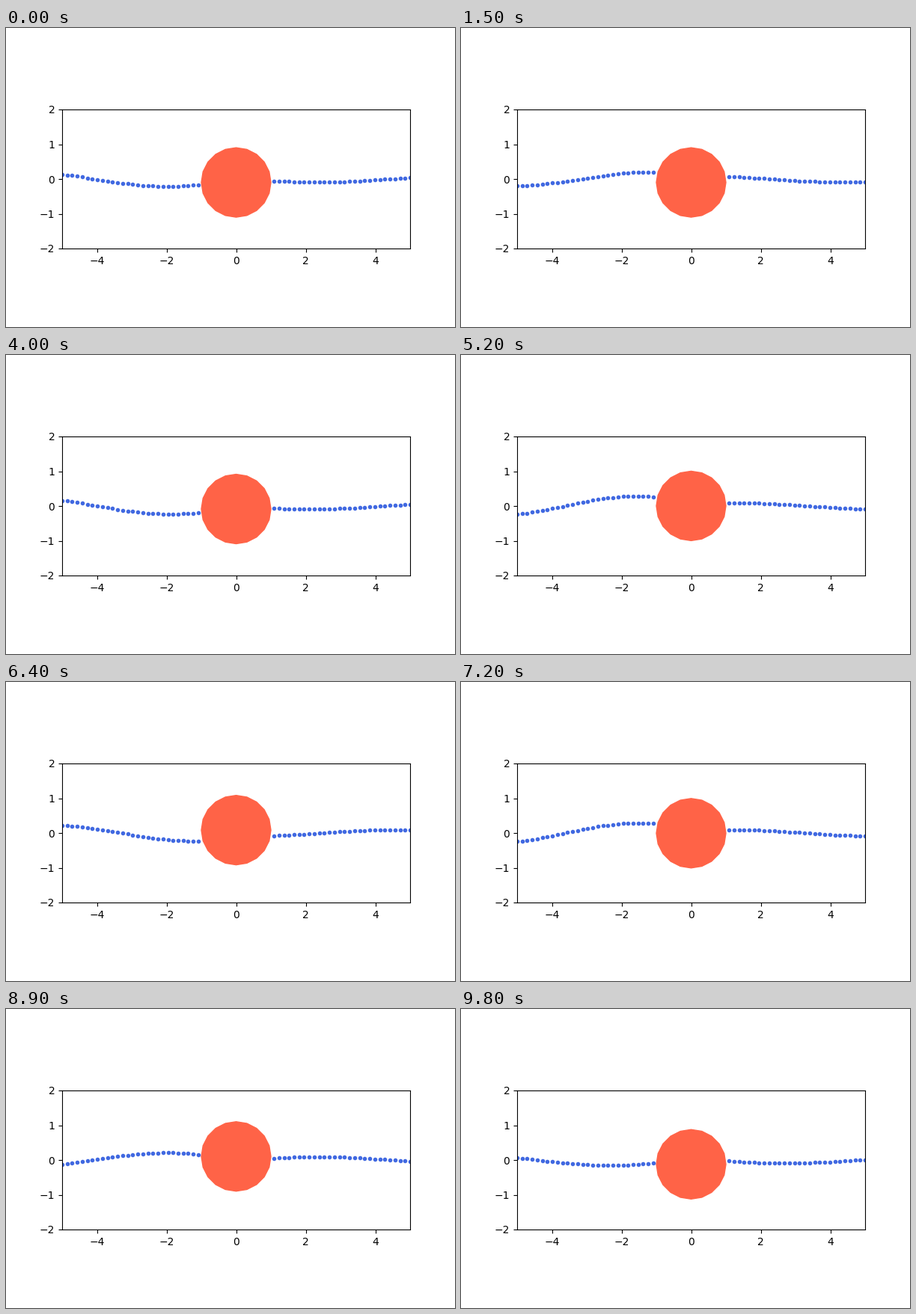
Recreate the animation shown at these times as a matplotlib script. Size 600 px wide and 400 px high, loop 9900 ms.

```python
import numpy as np
import matplotlib.pyplot as plt
from matplotlib.animation import FuncAnimation

FRAMES = 99
CYCLES = 5
K = 0.75  # wave number


def wave(amp, phase_deg):
    return amp * np.exp(1j * np.radians(phase_deg))


INCIDENT = wave(0.19, 68.4)
REFLECTED = wave(0.095, -158.4)
TRANSMITTED = wave(0.091, 80)
HEAVE = wave(0.137, 223.6)

fig, ax = plt.subplots(figsize=(6, 4), dpi=100)
ax.set_aspect("equal")
ax.set_xlim(-5, 5)
ax.set_ylim(-2, 2)

# Water surface on both sides of the floating body
x = np.linspace(-5, 5, 70)
x = x[np.abs(x) > 1]
left = INCIDENT * np.exp(-1j * K * x) + REFLECTED * np.exp(1j * K * x)
right = TRANSMITTED * np.exp(1j * K * x)
surface = np.where(x < 0, left, right)

angle = np.linspace(0, 2 * np.pi, 21)
circle = np.column_stack([np.cos(angle), np.sin(angle)])

(body,) = ax.fill(circle[:, 0], circle[:, 1], color="tomato")
(dots,) = ax.plot(x, surface.real, ".", color="royalblue")


def update(i):
    turn = np.exp(2j * np.pi * CYCLES * i / FRAMES)
    dots.set_ydata((surface * turn).real)
    body.set_xy(circle + [0, (HEAVE * turn).real])
    return dots, body


anim = FuncAnimation(fig, update, frames=FRAMES, interval=100,
                     repeat=True, repeat_delay=0)
plt.show()
```
